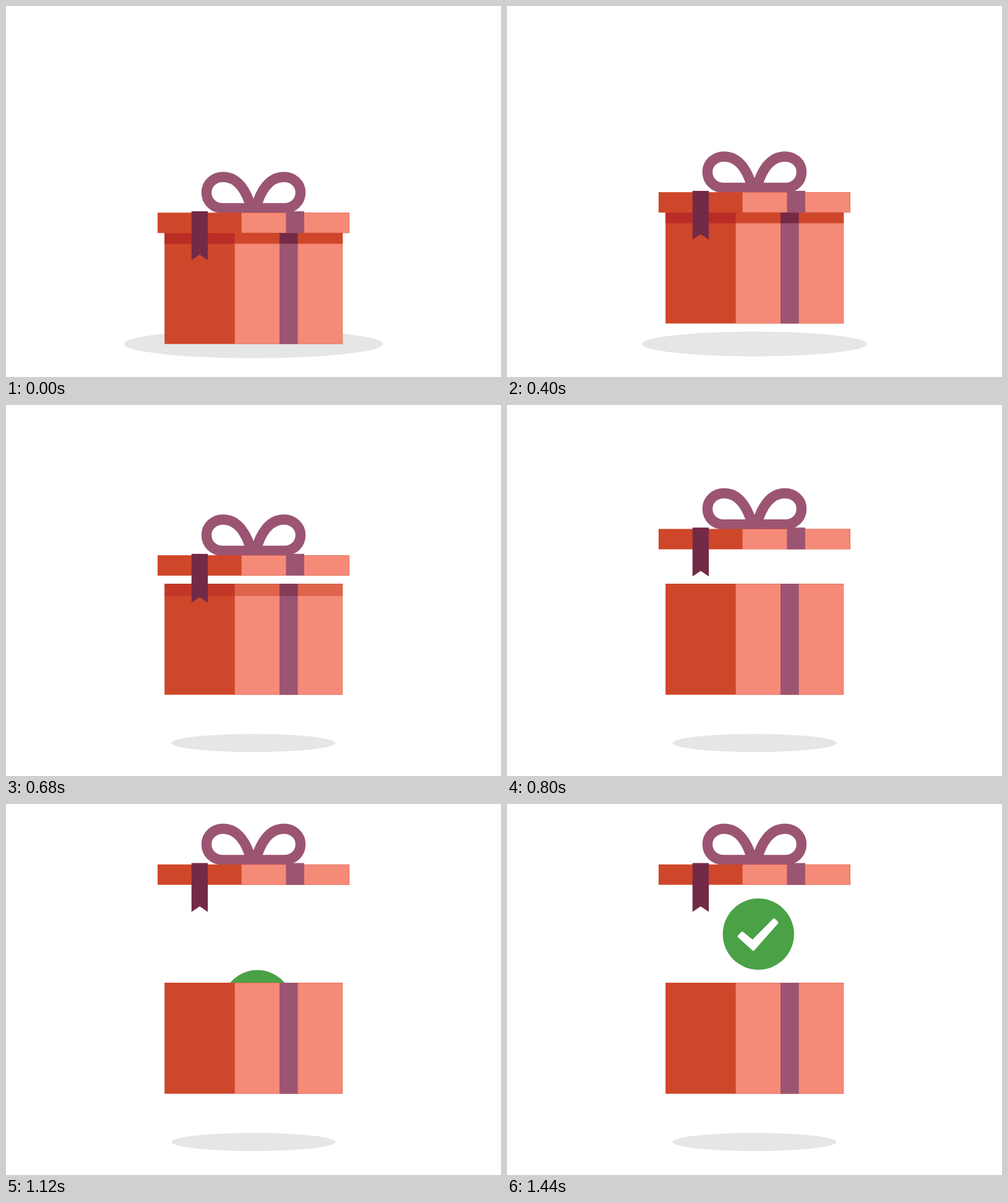
An HTML page for the animation above (2240 ms loop, 800 by 600 pixels).

```html
<!DOCTYPE html>
<html lang="en">
<head>
<meta charset="utf-8">
<title>Gift box</title>
<style>
  html, body { margin: 0; width: 100%; height: 100%; overflow: hidden; background: #fff; }
  svg { display: block; width: 100%; height: 100%; }
  .red { fill: #cf472b; }
  .pink { fill: #f58a78; }
  .mauve { fill: #9b5572; }
  .plum { fill: #732a47; }
  .crimson { fill: #b92d26; }
  .bow { fill: none; stroke: #9b5572; stroke-width: 16.5; }
  .tick { fill: #fff; stroke: #fff; stroke-width: 4; stroke-linejoin: round; }
</style>
</head>
<body>
<svg viewBox="0 0 800 600">
  <ellipse id="shadow" cx="400" cy="546.6" fill="#e6e6e6"/>
  <g id="badge">
    <circle cx="406.3" cy="210.4" r="57.6" fill="#4aa146"/>
    <path class="tick" d="M374.5 214 380.1 208.3 397 221.8 431.6 186.8 436.6 191.8 398.2 235.4Z"/>
  </g>
  <g id="box">
    <rect class="red" x="256.2" y="367" width="288" height="179.6"/>
    <rect class="pink" x="369.8" y="367.4" width="174" height="178.8"/>
    <rect class="mauve" x="442" y="367" width="29.6" height="179.6"/>
    <g id="band">
      <rect class="crimson" x="256.2" width="113.6" height="17.5"/>
      <rect class="red" x="369.8" width="174.4" height="17.5"/>
      <rect class="plum" x="442" width="29.6" height="17.5"/>
    </g>
  </g>
  <g id="lid">
    <g id="loop">
      <path class="bow" d="M400 327H350C335 327 324 316 324 301.500C324 287 336 276.500 351 276.500C375 276.500 389 300 396.500 327"/>
    </g>
    <use href="#loop" transform="matrix(-1 0 0 1 800 0)"/>
    <rect class="red" x="245" y="334.200" width="310" height="33"/>
    <rect class="pink" x="380.700" y="334.600" width="173.900" height="32.200"/>
    <rect class="mauve" x="452.500" y="332" width="29.500" height="35.200"/>
    <path class="plum" d="M299.800 332H326.200V411L313 402 299.800 411Z"/>
  </g>
</svg>
<script>
  const LOOP = 2240, STEP = 40;
  const $ = id => document.getElementById(id);
  const shadow = $('shadow'), badge = $('badge'), box = $('box'), band = $('band'), lid = $('lid');

  const progress = (t, from, to) => Math.min(1, Math.max(0, (t - from) / (to - from)));
  const ease = (t, from, to) => {
    const p = progress(t, from, to);
    return p * p * (3 - 2 * p);
  };
  const moveY = (el, y) => el.setAttribute('transform', `translate(0 ${y})`);

  function draw(t) {
    const rise = -78 * ease(t, 200, 645);
    const lift = -158.5 * ease(t, 584, 1124);
    const rx = 209 - 76.5 * ease(t, 240, 640);

    shadow.setAttribute('rx', rx);
    shadow.setAttribute('ry', rx * 0.11);
    moveY(box, rise);
    moveY(lid, rise + lift);
    moveY(badge, 178 * (1 - ease(t, 905, 1445)) + rise + 78);

    // The lid's shade stretches and fades as the lid leaves the box.
    band.setAttribute('transform', `translate(0 367) scale(1 ${1 - lift * 0.011})`);
    band.setAttribute('opacity', 1 - progress(t, 584, 800));
  }

  function tick() {
    const t = performance.now() % LOOP;
    draw(Math.floor(t / STEP) * STEP);
    requestAnimationFrame(tick);
  }
  tick();
</script>
</body>
</html>
```
